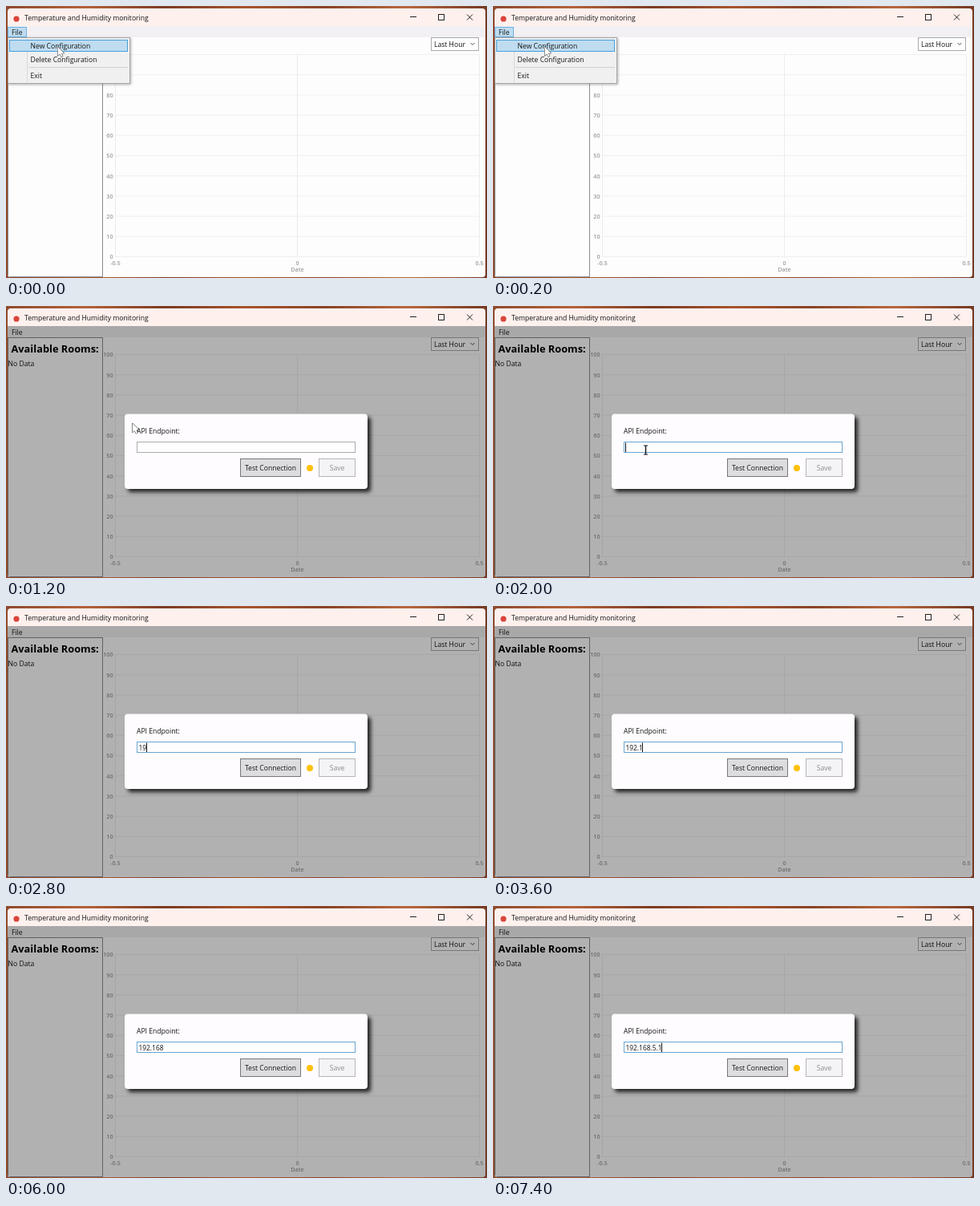
Write an HTML page with a canvas that moves like this. It is 600x339 px and loops after 8000 ms.

```html
<!DOCTYPE html>
<html lang="en">
<head>
<meta charset="utf-8">
<title>Temperature and Humidity monitoring</title>
<style>
  html, body { margin: 0; width: 100%; height: 100%; overflow: hidden; }
  canvas { display: block; width: 600px; height: 339px; }
</style>
</head>
<body>
<canvas id="stage" width="600" height="339"></canvas>
<script>
const ctx = document.getElementById('stage').getContext('2d');
const LOOP = 8000, STEP = 200;
const DIALOG_AT = 400, FOCUS_AT = 1800, POINTER_HIDES_AT = 2600;
const FAMILY = '"Open Sans", "Noto Sans", sans-serif';
const BODY = `8.6px ${FAMILY}`, INPUT = `8.4px ${FAMILY}`;
const AXIS = `600 7.2px ${FAMILY}`, HEADING = `bold 12.8px ${FAMILY}`;

// Start time, typed text, caret visible
const typing = [
  [0, '', false], [FOCUS_AT, '', true], [2400, '', false],
  [2600, '1', true], [2800, '19', true],
  [3200, '192', true], [3400, '192.', true], [3600, '192.1', true],
  [4000, '192.1', false], [4200, '192.16', true], [4800, '192.16', false],
  [5400, '192.16', true], [5600, '192.168', true], [6000, '192.168', false],
  [6400, '192.168', true], [7000, '192.168.', true],
  [7200, '192.168.5', true], [7400, '192.168.5.1', true]
];

function text(str, x, y, color = '#161616', font = BODY, align = 'left') {
  ctx.font = font;
  ctx.textAlign = align;
  ctx.fillStyle = color;
  ctx.fillText(str, x, y);
}

function box(x, y, w, h, fill, stroke) {
  ctx.fillStyle = fill;
  ctx.fillRect(x, y, w, h);
  if (!stroke) return;
  ctx.strokeStyle = stroke;
  ctx.lineWidth = 1;
  ctx.strokeRect(x + 0.5, y + 0.5, w - 1, h - 1);
}

function path(points, color, width = 1, close = false) {
  ctx.beginPath();
  points.forEach(([x, y]) => ctx.lineTo(x, y));
  if (close) ctx.closePath();
  ctx.strokeStyle = color;
  ctx.lineWidth = width;
  ctx.stroke();
}

function disc(x, y, r, color) {
  ctx.beginPath();
  ctx.arc(x, y, r, 0, Math.PI * 2);
  ctx.fillStyle = color;
  ctx.fill();
}

function drawDesktop() {
  const g = ctx.createLinearGradient(0, 0, 600, 0);
  ['#8f4a2c', '#b5623a', '#7c3b22', '#a9552f', '#8a4426', '#b9683f', '#743922']
    .forEach((c, i) => g.addColorStop(i / 6, c));
  ctx.fillStyle = g;
  ctx.fillRect(0, 0, 600, 339);
}

function drawTitleBar() {
  ctx.fillStyle = '#fdf0ed';
  ctx.fillRect(2, 3, 596, 22);
  disc(13, 16, 3.6, '#d9443a');
  text('Temperature and Humidity monitoring', 23, 18);
  path([[504, 13.5], [512, 13.5]], '#222');
  ctx.strokeRect(539.5, 10.5, 7, 7);
  path([[575, 10.5], [582, 17.5]], '#222');
  path([[582, 10.5], [575, 17.5]], '#222');
}

function drawChart() {
  for (let i = 0; i <= 10; i++) {
    const y = 312.5 - i * 25.2;
    path([[136, y], [590, y]], '#ededed', 0.8);
    text(String(i * 10), 133.5, y + 2.8, '#9b9b9b', AXIS, 'right');
  }
  [['-0.5', 136.5], ['0', 363.5], ['0.5', 590.5]].forEach(([label, x]) => {
    path([[x, 60.5], [x, 312.5]], '#e8e8e8', 0.8);
    text(label, x, 323, '#9b9b9b', AXIS, 'center');
  });
  text('Date', 363.5, 330.5, '#9b9b9b', AXIS, 'center');
}

function drawContent() {
  box(2, 25, 596, 14, '#f2f0f2');
  box(2, 39, 596, 299, '#fefdfe');
  drawChart();
  box(2, 39, 119, 299, '#fefdfe', '#8b8b8f');
  text('Available Rooms:', 6.5, 58, '#000', HEADING);
  text('No Data', 2.5, 75);
  box(530, 39, 60, 17, '#fdfdfd', '#aaaaae');
  text('Last Hour', 534, 51);
  path([[579.5, 46], [582, 48.5], [584.5, 46]], '#555');
  text('File', 7, 35.5);
}

function drawMenu() {
  box(2, 26, 24, 13, '#bddcf1', '#70b2e3');
  text('File', 7, 35.5);
  ctx.save();
  ctx.shadowColor = 'rgba(0,0,0,.3)';
  ctx.shadowBlur = 3;
  ctx.shadowOffsetX = ctx.shadowOffsetY = 1;
  box(2, 39, 153, 58, '#f1f0f1');
  ctx.restore();
  box(2, 39, 153, 58, '#f1f0f1', '#a5a5a7');
  path([[26.5, 41], [26.5, 95]], '#d8d8d8');
  path([[28, 76.5], [152, 76.5]], '#d0d0d0');
  box(4, 42, 148, 15, '#bfdcf0', '#44a0dc');
  text('New Configuration', 30.5, 53);
  text('Delete Configuration', 30.5, 69.5);
  text('Exit', 30.5, 90);
}

function drawDialog(t) {
  ctx.save();
  ctx.shadowColor = 'rgba(0,0,0,.8)';
  ctx.shadowBlur = 5;
  ctx.shadowOffsetX = ctx.shadowOffsetY = 4;
  ctx.beginPath();
  ctx.roundRect(148, 134.5, 303, 93.5, 4);
  ctx.fillStyle = '#fefcfe';
  ctx.fill();
  ctx.restore();

  text('API Endpoint:', 163, 159);
  box(163, 169, 273, 14, '#fffeff', t >= FOCUS_AT ? '#69a5cf' : '#acacb0');
  const [, value, caret] = typing.findLast(([start]) => t >= start);
  text(value, 165.5, 179.5, '#111', INPUT);
  if (caret) {
    const x = Math.round(165 + ctx.measureText(value).width);
    box(x, 170.5, 1, 11.5, '#111');
  }

  box(292, 190, 76, 23, '#dddcde', '#77777a');
  text('Test Connection', 330, 205, '#161616', BODY, 'center');
  disc(379, 202, 4, '#ffc10a');
  box(390, 190, 46, 23, '#f4f3f5', '#b5b5b9');
  text('Save', 413, 205, '#8b8b8e', BODY, 'center');
}

function drawArrow(x, y) {
  const shape = [[0, 0], [0, 11.5], [2.6, 9.2], [4.4, 13], [6.3, 12.1], [4.6, 8.5], [8, 8.2]];
  ctx.save();
  ctx.translate(x, y);
  path(shape, '#222', 1, true);
  ctx.fillStyle = '#fff';
  ctx.fill();
  ctx.restore();
}

function drawIBeam(x, y) {
  path([[x - 2.5, y - 5.5], [x + 2.5, y - 5.5]], '#111');
  path([[x - 2.5, y + 5.5], [x + 2.5, y + 5.5]], '#111');
  path([[x, y - 5.5], [x, y + 5.5]], '#111', 1.4);
}

function drawPointer(t) {
  if (t >= POINTER_HIDES_AT) return;
  const p = Math.min(1, Math.max(0, (t - 400) / 1200));
  const ease = p * p * (3 - 2 * p);
  const x = 64.5 + 126 * ease, y = 50.5 + 129 * ease;
  if (y > 169) drawIBeam(x, y);
  else drawArrow(x, y);
}

function draw(t) {
  drawDesktop();
  ctx.save();
  ctx.beginPath();
  ctx.roundRect(2, 3, 596, 335, 4);
  ctx.clip();
  drawTitleBar();
  drawContent();
  if (t < DIALOG_AT) {
    drawMenu();
  } else {
    box(2, 25, 596, 313, 'rgba(0,0,0,.3)');
    drawDialog(t);
  }
  ctx.restore();
  drawPointer(t);
}

function tick(now) {
  draw(Math.floor((now % LOOP) / STEP) * STEP);
  requestAnimationFrame(tick);
}
requestAnimationFrame(tick);
</script>
</body>
</html>
```
